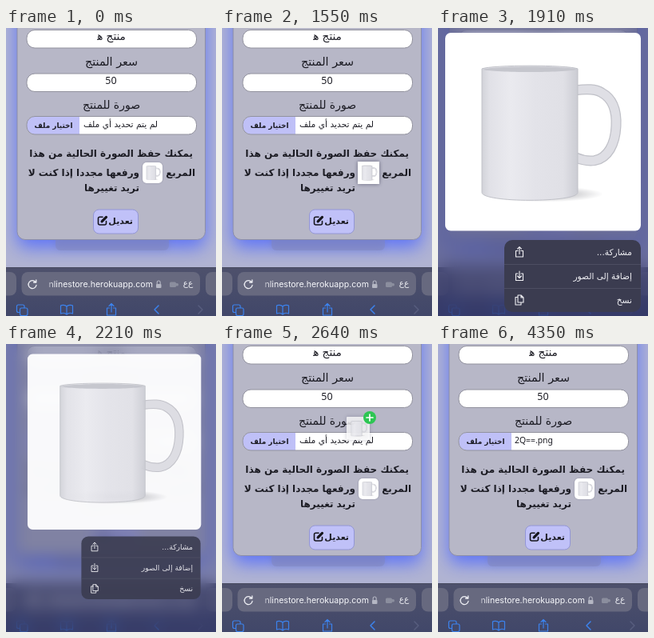
Write an HTML page with a canvas that moves like this. It is 263 by 360 pixels and loops after 4500 ms.

```html
<!DOCTYPE html>
<html lang="ar">
<head>
<meta charset="utf-8">
<title>تعديل المنتج</title>
<style>
  html, body { margin: 0; width: 100%; height: 100%; overflow: hidden; background: #b0b3d2; }
  canvas { display: block; width: 263px; height: 360px; }
</style>
</head>
<body>
<canvas id="stage"></canvas>
<script>
const W = 263, H = 360, LOOP = 4500;
const AR = '"DejaVu Sans", sans-serif';
const LATIN = '"Noto Sans", "Open Sans", sans-serif';
const UI = 'Inter, Roboto, sans-serif';
const dpr = window.devicePixelRatio || 1;

function setup(canvas) {
  canvas.width = W * dpr;
  canvas.height = H * dpr;
  const c = canvas.getContext('2d');
  c.scale(dpr, dpr);
  return c;
}

const stage = setup(document.getElementById('stage'));
const buffer = document.createElement('canvas');
const page = setup(buffer);

const clamp = v => Math.max(0, Math.min(1, v));
const ramp = (t, a, b) => clamp((t - a) / (b - a));
const smooth = k => k * k * (3 - 2 * k);

// Each key is [time, ...values]; values are eased between keys.
function track(keys, t) {
  if (t <= keys[0][0]) return keys[0].slice(1);
  for (let i = 1; i < keys.length; i++) {
    const a = keys[i - 1], b = keys[i];
    if (t < b[0]) {
      const k = smooth(ramp(t, a[0], b[0]));
      return a.slice(1).map((v, j) => v + (b[j + 1] - v) * k);
    }
  }
  return keys[keys.length - 1].slice(1);
}

function box(c, x, y, w, h, r, fill, line, width = 1) {
  c.beginPath();
  c.roundRect(x, y, w, h, r);
  if (fill) { c.fillStyle = fill; c.fill(); }
  if (line) { c.strokeStyle = line; c.lineWidth = width; c.stroke(); }
}

function shadow(c, color, blur, y = 0) {
  c.shadowColor = color;
  c.shadowBlur = blur * dpr;
  c.shadowOffsetY = y * dpr;
}

function text(c, str, x, y, size, { align = 'center', bold = false, color = '#1c1c24', font = AR, rtl = font === AR } = {}) {
  c.font = `${bold ? 'bold ' : ''}${size}px ${font}`;
  c.direction = rtl ? 'rtl' : 'ltr';
  c.textAlign = align;
  c.fillStyle = color;
  c.fillText(str, x, y);
}

function stroke(c, d, color, width, x = 0, y = 0) {
  c.save();
  c.translate(x, y);
  c.strokeStyle = color;
  c.lineWidth = width;
  c.lineCap = c.lineJoin = 'round';
  c.stroke(new Path2D(d));
  c.restore();
}

const HANDLE = new Path2D('M163 72C178 70 188 70 196 75C211 83 215 98 214 117C213 139 204 157 187 160C178 161 172 160 163 156');
const BODY = new Path2D('M46 45C60 40 152 40 166 45L166 200C166 213 46 213 46 200Z');
const RIM = new Path2D('M47 46C62 41 150 41 165 46C150 50 62 50 47 46Z');

// Square white picture of a mug, designed on a 245 x 248 grid.
function mugPicture(c, x, y, w, h, r) {
  c.save();
  box(c, x, y, w, h, r, '#fff');
  c.shadowColor = 'transparent';
  c.clip();
  c.translate(x, y);
  c.scale(w / 245, h / 248);

  const shade = c.createRadialGradient(0, 0, 0, 0, 0, 1);
  shade.addColorStop(0, 'rgba(90,90,100,.55)');
  shade.addColorStop(1, 'rgba(90,90,100,0)');
  c.save();
  c.translate(122, 202);
  c.scale(76, 10);
  c.fillStyle = shade;
  c.fillRect(-1, -1, 2, 2);
  c.restore();

  c.lineCap = 'butt';
  c.strokeStyle = '#c0c1c8';
  c.lineWidth = 13;
  c.stroke(HANDLE);
  c.strokeStyle = '#dfdfe5';
  c.lineWidth = 10.5;
  c.stroke(HANDLE);

  const side = c.createLinearGradient(46, 0, 166, 0);
  [[0, '#d2d3d9'], [.08, '#e1e1e7'], [.3, '#eaeaef'], [.55, '#e3e3e9'], [.85, '#e0e0e6'], [1, '#cbccd3']]
    .forEach(s => side.addColorStop(...s));
  c.fillStyle = side;
  c.fill(BODY);
  c.strokeStyle = '#c0c1c8';
  c.lineWidth = 1;
  c.stroke(BODY);
  c.fillStyle = '#c5c6cd';
  c.fill(RIM);
  c.restore();
}

function drawFields(c, named) {
  const edge = '#92929e';
  box(c, 26, 2.5, 212.5, 22.5, 10, '#fff', edge);
  text(c, 'منتج ه\u200d', 132, 15, 13.6);
  text(c, 'سعر المنتج', 132, 47, 14.4);
  box(c, 26, 57, 212.5, 22.5, 10, '#fff', edge);
  text(c, '50', 131.5, 69.5, 12.5, { font: LATIN });
  text(c, 'صورة للمنتج', 132, 101, 14);

  box(c, 26, 110.5, 212.5, 22.5, 10, '#fff');
  box(c, 26, 110.5, 66, 22.5, [10, 0, 0, 10], '#bfc0f7');
  box(c, 26, 110.5, 212.5, 22.5, 10, null, edge);
  text(c, 'اختيار ملف', 59.5, 125, 8.9, { bold: true });
  if (named) text(c, '2Q==.png', 96, 124, 10.4, { font: LATIN, align: 'left' });
  else text(c, 'لم يتم تحديد أي ملف', 190, 124, 10.7, { align: 'right' });
}

function drawNote(c) {
  const right = { bold: true, align: 'right' };
  text(c, 'يمكنك حفظ الصورة الحالية من هذا', 234, 161, 12, right);
  text(c, 'المربع', 237, 184.5, 12, right);
  text(c, 'ورفعها مجددا إذا كنت لا', 167, 184.5, 12, right);
  text(c, 'تريد تغييرها', 167, 203.5, 12, right);

  box(c, 109.5, 227, 56, 30, 7, '#c0c1f8', '#9396d6');
  text(c, 'تعديل', 159, 245, 11, right);
  stroke(c, 'M5.5 1.2H2Q0 1.2 0 3.2V9Q0 11 2 11H8Q10 11 10 9V6.5', '#15151c', 1.6, 115.5, 235);
  stroke(c, 'M4.6 6.8L10 1.4', '#15151c', 3.2, 115.5, 235);
}

function drawBrowser(c) {
  const blue = '#3c83ee', pale = '#eff0f5', pill = '#67697f';
  const bar = c.createLinearGradient(0, 299, 0, 360);
  bar.addColorStop(0, '#4e516c');
  bar.addColorStop(1, '#414769');
  c.fillStyle = bar;
  c.fillRect(0, 299, W, 61);
  c.fillStyle = '#474a5f';
  c.fillRect(0, 299, W, 1);
  box(c, -12, 305, 25, 29.5, 8, pill);
  box(c, 250, 305, 25, 29.5, 8, pill);
  box(c, 19.5, 305, 223.5, 29.5, 8, pill);

  stroke(c, 'M4 -3A5 5 0 1 0 5 1M4.8 -5.5V-2.5H1.6', pale, 1.3, 33, 320.5);
  const fade = c.createLinearGradient(48, 0, 62, 0);
  fade.addColorStop(0, 'rgba(245,246,250,.25)');
  fade.addColorStop(1, '#f5f6fa');
  text(c, 'nlinestore.herokuapp.com', 184, 324, 10.6, { font: UI, align: 'right', color: fade });
  box(c, 188, 320, 6.5, 5, 1, '#b4b6c3');
  stroke(c, 'M0 4V2A2 2 0 0 1 4 2V4', '#b4b6c3', 1.1, 189.2, 316);
  box(c, 205, 317.5, 8, 6.5, 1.5, '#8b8e9e');
  box(c, 212, 319, 4, 3.5, 1.5, '#8b8e9e');
  text(c, 'ع\u200cع', 228, 322, 10.5, { color: pale });

  box(c, 13.5, 346, 9.5, 9.5, 2, null, blue, 1.2);
  box(c, 17.5, 350, 9.5, 9.5, 2, '#434969', blue, 1.2);
  stroke(c, 'M0 -4C-2 -6 -6 -6 -7.5 -5V5C-5 4 -2 4 0 6C2 4 5 4 7.5 5V-5C6 -6 2 -6 0 -4V6', blue, 1.2, 76, 352);
  stroke(c, 'M-2.5 -2H-5.5V7H5.5V-2H2.5M0 3V-7M-3 -4.5L0 -7.5L3 -4.5', blue, 1.2, 132, 352);
  stroke(c, 'M2 -5L-3 0L2 5', blue, 1.5, 189, 352);
  stroke(c, 'M-2 -5L3 0L-2 5', '#575d7e', 1.5, 243, 352);
}

function drawPanel(c) {
  c.fillStyle = '#b0b3d2';
  c.fillRect(0, 0, W, H);
  c.save();
  shadow(c, 'rgba(88,112,250,.95)', 22, 10);
  box(c, 14, -70, 235.5, 334.5, 10, '#b7b7c7');
  shadow(c, 'rgba(112,118,168,.6)', 10);
  box(c, 62, 250, 142, 28, 6, 'rgba(128,134,190,.5)');
  c.restore();
  box(c, 14, -70, 235.5, 334.5, 10, '#b7b7c7', '#8d8fa8');
}

function drawPage(t) {
  const c = page;
  drawPanel(c);
  drawFields(c, t >= 3900);
  drawNote(c);

  if (t < 1600 || t > 2480) {
    const lift = t < 1600 ? smooth(ramp(t, 1350, 1550)) : 0;
    c.save();
    shadow(c, `rgba(50,50,75,${.35 + .25 * lift})`, 2 + 3 * lift);
    mugPicture(c, 171 - lift, 168 - lift, 25 + 2 * lift, 26 + 2 * lift, 5 * (1 - lift));
    c.restore();
  }
  drawBrowser(c);
}

const MENU = [
  ['مشاركة...', 284, 'M-2 -1.5H-4.5V6H4.5V-1.5H2M0 2.5V-6M-2.5 -3.8L0 -6.3L2.5 -3.8'],
  ['إضافة إلى الصور', 313.5, 'M-2 -3H-4.5V5.5H4.5V-3H2M0 -6V2.5M-2.5 0L0 2.5L2.5 0'],
  ['نسخ', 343.5, 'M-2 -6H2L5 -3V3H-2ZM-2 -3.5H-5V6H2V3M2 -6V-3H5']
];

// Keys: right edge, top, scale, opacity
const menuKeys = [
  [1690, 220, 225, .3, 0], [1870, 254, 265, 1, 1], [2120, 254, 265, 1, 1],
  [2350, 224, 194, .632, .72], [2470, 190, 125, .25, 0]
];

function drawMenu(c, t) {
  const [right, top, scale, alpha] = track(menuKeys, t);
  if (!alpha) return;
  c.save();
  c.globalAlpha = alpha;
  c.translate(right, top);
  c.scale(scale, scale);
  c.translate(-254, -265);
  box(c, 83, 265, 171, 90, 10, '#3b3c50');
  MENU.forEach(([label, y, icon], i) => {
    text(c, label, 243, y, 10.6, { align: 'right', color: '#f1f1f5' });
    stroke(c, icon, '#f1f1f5', 1.1, 102, 280 + 30 * i);
    if (i) {
      c.fillStyle = '#55566b';
      c.fillRect(83, 265 + 30 * i, 171, .7);
    }
  });
  c.restore();
}

// Keys: x, y, width, height, radius, opacity
const pictureKeys = [
  [1600, 170, 167, 27, 28, 0, 1], [1860, 9, 6, 245, 247.5, 7, 1],
  [2120, 9, 6, 245, 247.5, 7, 1], [2350, 61, 25, 165, 166, 5, .86],
  [2560, 156, 91, 29, 29, 1, .78], [2640, 156, 91, 29, 29, 1, .78],
  [3430, 153, 94, 30, 31, 1, .82], [3740, 153, 94, 30, 31, 1, .82],
  [3930, 158, 102, 18, 18, 1, 0]
];

function drawPicture(c, t) {
  if (t < 1600 || t >= 3930) return;
  const [x, y, w, h, r, alpha] = track(pictureKeys, t);
  c.save();
  c.globalAlpha = alpha;
  if (t > 2480) shadow(c, 'rgba(40,40,70,.3)', 5);
  mugPicture(c, x, y, w, h, r);
  c.restore();

  const badge = ramp(t, 2480, 2580) * (1 - ramp(t, 3740, 3830));
  if (!badge) return;
  c.save();
  c.globalAlpha = badge;
  c.translate(x + w, y + 1);
  box(c, -8, -8, 16, 16, 8, '#2dc653');
  stroke(c, 'M-4 0H4M0 -4V4', '#fff', 1.7);
  c.restore();
}

function draw(t) {
  drawPage(t);
  const c = stage;
  c.drawImage(buffer, 0, 0, W, H);
  const [blur, dim] = track([
    [1600, 0, 0], [1840, 11, .5], [2120, 11, .5], [2350, 4, .16], [2560, 0, 0]
  ], t);
  if (blur > .05) {
    c.save();
    c.filter = `blur(${blur * dpr}px)`;
    c.drawImage(buffer, 0, 0, W, H);
    c.restore();
    c.fillStyle = `rgba(40,44,104,${dim})`;
    c.fillRect(0, 0, W, H);
  }
  drawMenu(c, t);
  drawPicture(c, t);
}

const start = performance.now();
function tick() {
  draw((performance.now() - start) % LOOP);
  requestAnimationFrame(tick);
}
tick();
</script>
</body>
</html>
```
